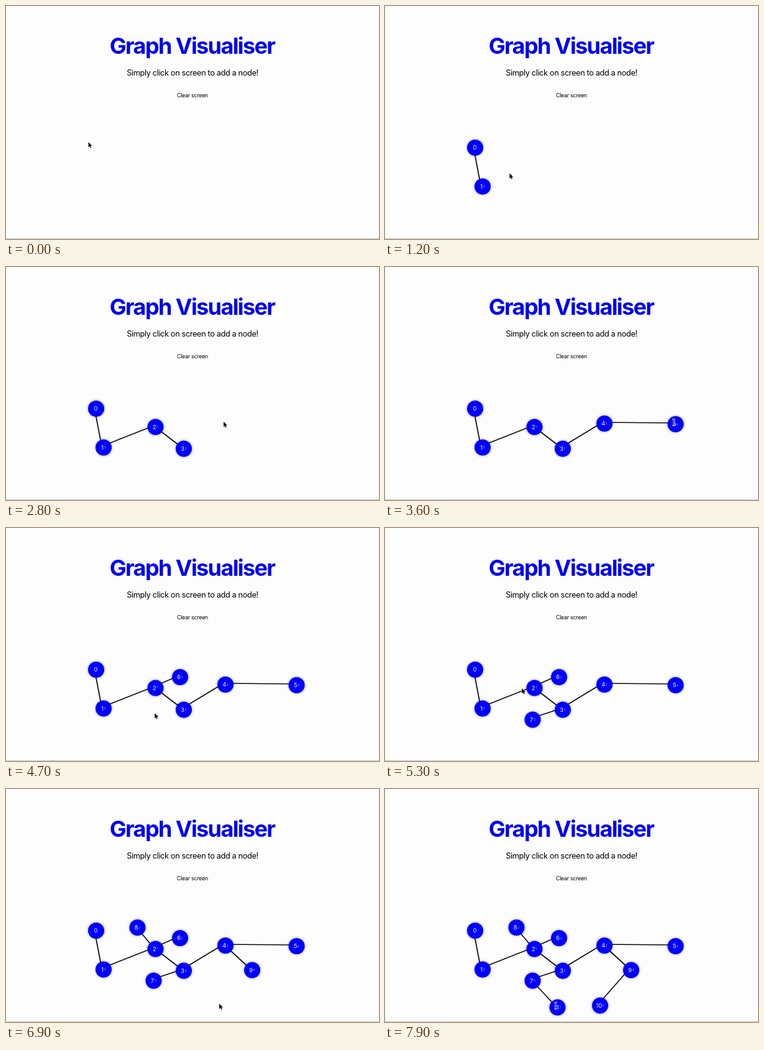
Recreate the animation shown at these times as an HTML page with a canvas. Size 600 by 375 pixels, loop 8000 ms.

```html
<!DOCTYPE html>
<html lang="en">
<head>
<meta charset="utf-8">
<title>Graph Visualiser</title>
<style>
  html, body { margin: 0; width: 600px; height: 375px; overflow: hidden; background: #fdfdfd; }
  canvas { display: block; }
</style>
</head>
<body>
<canvas id="stage" width="600" height="375"></canvas>
<script>
const ctx = document.getElementById('stage').getContext('2d');
const LOOP = 8000, STEP = 100, RADIUS = 13;
const BLUE = '#0000fa';

// x, y, parent, time of the click that adds the node
const nodes = [
  [145, 228, -1, 300], [157, 290.5, 0, 900], [240.5, 257.5, 1, 1600],
  [286, 292.5, 2, 2300], [353, 252, 3, 2900], [467.5, 253, 4, 3600],
  [280, 240, 2, 4300], [237.5, 308.5, 3, 5000], [211.5, 223, 2, 5700],
  [396, 291.5, 4, 6500], [346, 348.5, 9, 7100], [277.5, 351.5, 7, 7800]
].map(([x, y, parent, time]) => ({ x, y, parent, time }));

const clickPoint = n => ({ x: n.x - 3, y: n.y - 3 });

function text(str, x, y, size, { color = '#000', weight = 400, spacing = 0 } = {}) {
  ctx.font = `${weight} ${size}px Inter, sans-serif`;
  ctx.letterSpacing = `${spacing * size}px`;
  ctx.fillStyle = color;
  ctx.fillText(str, x, y);
  return ctx.measureText(str).width;
}

function drawPage() {
  ctx.fillStyle = '#fdfdfd';
  ctx.fillRect(0, 0, 600, 375);
  ctx.fillStyle = '#c4c4c4';
  ctx.fillRect(0, 374, 600, 1);
  ctx.textAlign = 'center';
  ctx.textBaseline = 'alphabetic';
  text('Graph Visualiser', 299.5, 76.5, 36, { color: '#0000f2', weight: 700, spacing: -0.045 });
  text('Simply click on screen to add a node!', 300, 111.5, 12.75, { spacing: -0.029 });
  text('Clear screen', 300, 147.3, 8.8, { spacing: -0.025 });
}

function drawEdge(a, b) {
  ctx.strokeStyle = '#0a0a0a';
  ctx.lineWidth = 1.7;
  ctx.beginPath();
  ctx.moveTo(a.x - 3, a.y - 2);
  ctx.lineTo(b.x - 3, b.y - 2);
  ctx.stroke();
}

function drawNode(node, index) {
  const { x, y, parent } = node;
  ctx.save();
  ctx.shadowColor = 'rgba(0, 0, 0, 0.4)';
  ctx.shadowBlur = 4;
  ctx.fillStyle = BLUE;
  ctx.beginPath();
  ctx.arc(x, y, RADIUS, 0, Math.PI * 2);
  ctx.fill();
  ctx.restore();

  const hasParent = parent >= 0;
  const labelX = x - (hasParent ? 1.8 : 0.6);
  const width = text(index, labelX, y + 3.3, 9.2, { color: '#fff' });
  if (hasParent) {
    text(parent, labelX + width / 2 + 2, y + 1.6, 4.5, { color: 'rgba(255,255,255,0.7)' });
  }
}

function cursorAt(t) {
  let pos = { x: 132.5, y: 219 };
  for (const node of nodes) {
    const arrive = node.time - 200, leave = Math.max(0, arrive - 300);
    if (t < leave) break;
    const goal = clickPoint(node);
    const p = Math.min(1, (t - leave) / (arrive - leave));
    const k = 1 - (1 - p) ** 2;
    pos = { x: pos.x + (goal.x - pos.x) * k, y: pos.y + (goal.y - pos.y) * k };
    if (p < 1) break;
  }
  return pos;
}

function drawArrow({ x, y }) {
  const outline = [[0, 0], [0, 8.6], [1.9, 6.8], [3.2, 9.7], [4.7, 9], [3.4, 6.2], [6, 6.1]];
  ctx.beginPath();
  outline.forEach(([dx, dy]) => ctx.lineTo(x + dx, y + dy));
  ctx.closePath();
  ctx.lineJoin = 'round';
  ctx.strokeStyle = '#fff';
  ctx.lineWidth = 1.2;
  ctx.stroke();
  ctx.fillStyle = '#111';
  ctx.fill();
}

function drawTextCursor({ x, y }) {
  ctx.beginPath();
  for (const side of [-1, 1]) {
    ctx.moveTo(x + side * 2.4, y - 5);
    ctx.quadraticCurveTo(x, y - 5, x, y - 3.4);
    ctx.lineTo(x, y + 3.4);
    ctx.quadraticCurveTo(x, y + 5, x + side * 2.4, y + 5);
  }
  ctx.strokeStyle = '#e8e8e8';
  ctx.lineWidth = 2;
  ctx.stroke();
  ctx.strokeStyle = '#333';
  ctx.lineWidth = 0.8;
  ctx.stroke();
}

function draw(t) {
  drawPage();
  const shown = nodes.filter(n => n.time <= t);
  shown.forEach(n => n.parent >= 0 && drawEdge(nodes[n.parent], n));
  shown.forEach(drawNode);
  const pos = cursorAt(t);
  const overLabel = shown.some(n => {
    const c = clickPoint(n);
    return Math.hypot(pos.x - c.x, pos.y - c.y) < 5;
  });
  (overLabel ? drawTextCursor : drawArrow)(pos);
}

const start = performance.now();
function tick() {
  const t = (performance.now() - start) % LOOP;
  draw(Math.floor(t / STEP) * STEP);
  requestAnimationFrame(tick);
}
tick();
</script>
</body>
</html>
```
